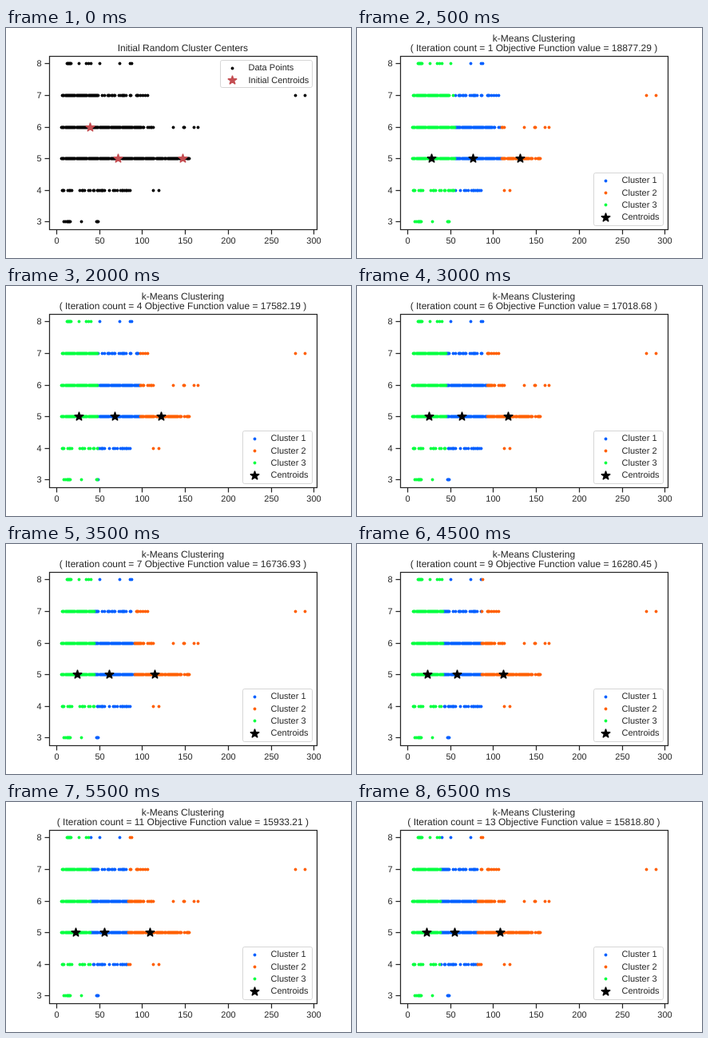
Animation of 432x288 px, one loop 7000 ms. Source, as an HTML page with a canvas:

```html
<!DOCTYPE html>
<html lang="en">
<head>
<meta charset="utf-8">
<title>k-Means Clustering</title>
<style>
  html, body { margin: 0; height: 100%; overflow: hidden; background: #fff; }
  canvas { display: block; }
</style>
</head>
<body>
<canvas id="plot" width="432" height="288"></canvas>
<script>
const ctx = document.getElementById('plot').getContext('2d');
const STEP_MS = 500, LAST = 13;
const INK = '#262626', RED = '#c44e52', BLUE = '#0060ff', ORANGE = '#ff6000', GREEN = '#05ff41';

// Each row is filled up to `solid`, thins out until `last`, and may have a few strays
const rows = [
  { y: 8, first: 12, solid: 17, last: 50, chance: 0.17, strays: [74, 86, 88] },
  { y: 7, first: 7, solid: 49, last: 106, chance: 0.45, strays: [278, 289] },
  { y: 6, first: 6, solid: 99, last: 113, chance: 0.7, strays: [136, 148, 149, 160, 165] },
  { y: 5, first: 6, solid: 112, last: 155, chance: 0.8, strays: [] },
  { y: 4, first: 7, solid: 9, last: 86, chance: 0.42, strays: [113, 119] },
  { y: 3, first: 9, solid: 9, last: 16, chance: 0.7, strays: [29, 47, 48, 49] }
];
const random = (x, y) => {
  const v = Math.sin(x * 12.9898 + y * 78.233) * 43758.5453;
  return v - Math.floor(v);
};
const points = rows.flatMap(({ y, first, solid, last, chance, strays }) => {
  const xs = [...strays];
  for (let x = first; x <= last; x++) {
    if (x <= solid || x === last || random(x, y) < chance) xs.push(x);
  }
  return xs.map(x => ({ x, y }));
});

// Low, middle and high centroid after n iterations
function centroids(n) {
  if (n === 0) return [39.5, 72, 147.5];
  const left = ((LAST - n) / (LAST - 1)) ** 1.75;
  return [Math.max(22.2, 28.6 - 0.57 * n), 55 + 21.5 * left, 108 + 23.5 * left];
}

const objectiveKeys = [
  [2, 18445.59], [4, 17582.19], [7, 16736.93], [9, 16280.45], [11, 15933.21], [13, 15818.80]
];
function objective(n) {
  const i = Math.max(1, objectiveKeys.findIndex(([at]) => at >= n));
  const [[n0, v0], [n1, v1]] = objectiveKeys.slice(i - 1, i + 1);
  return v0 + (v1 - v0) * (n - n0) / (n1 - n0);
}

// Data to pixel centres
const snap = v => Math.round(v) + 0.5;
const px = x => snap(62.77 + x * 1.0755);
const py = y => snap(44.44 + (8 - y) * 39.535);

function text(str, x, y, size = 11, align = 'left') {
  ctx.font = `${size}px "Liberation Sans", Arial, sans-serif`;
  ctx.textRendering = 'geometricPrecision';
  ctx.textAlign = align;
  ctx.fillStyle = INK;
  ctx.fillText(str, x, y);
}

function dot(x, y, color) {
  ctx.fillStyle = color;
  ctx.beginPath();
  ctx.arc(x, y, 1.9, 0, 2 * Math.PI);
  ctx.fill();
}

function star(x, y, color) {
  ctx.beginPath();
  for (let i = 0; i < 10; i++) {
    const r = i % 2 ? 2.25 : 5.9, a = i * Math.PI / 5;
    ctx.lineTo(x + r * Math.sin(a), y - r * Math.cos(a));
  }
  ctx.closePath();
  ctx.fillStyle = ctx.strokeStyle = color;
  ctx.lineWidth = 1.3;
  ctx.lineJoin = 'bevel';
  ctx.fill();
  ctx.stroke();
}

function line(x1, y1, x2, y2) {
  ctx.beginPath();
  ctx.moveTo(x1, y1);
  ctx.lineTo(x2, y2);
  ctx.stroke();
}

function axes() {
  ctx.strokeStyle = INK;
  ctx.lineWidth = 1.25;
  ctx.lineJoin = 'miter';
  ctx.strokeRect(54.5, 35.5, 335, 217);
  for (let x = 0; x <= 300; x += 50) {
    line(px(x), 252.5, px(x), 258.5);
    text(x, px(x), 270, 11, 'center');
  }
  for (let y = 3; y <= 8; y++) {
    line(48.5, py(y), 54.5, py(y));
    text(y, 44.5, py(y) + 3.5, 11, 'right');
  }
}

function legend(x, y, width, height, entries) {
  ctx.beginPath();
  ctx.roundRect(x, y, width, height, 2.2);
  ctx.fillStyle = 'rgba(255,255,255,0.8)';
  ctx.strokeStyle = 'rgba(204,204,204,0.8)';
  ctx.lineWidth = 1;
  ctx.fill();
  ctx.stroke();
  entries.forEach(([label, mark, color], i) => {
    const rowY = y + 9.6 + i * 15.4;
    mark(x + 15, Math.floor(rowY) + 0.5, color);
    text(label, x + 35, Math.round(rowY + 3));
  });
}

function drawStart() {
  text('Initial Random Cluster Centers', 221.4, 29, 12, 'center');
  points.forEach(p => dot(px(p.x), py(p.y), '#000'));
  centroids(0).forEach((x, i) => star(px(x), py(i ? 5 : 6), RED));
  legend(268.5, 40.5, 115, 34, [
    ['Data Points', dot, '#000'], ['Initial Centroids', star, RED]
  ]);
}

function drawIteration(n) {
  text('k-Means Clustering', 221.4, 17, 12, 'center');
  text(`( Iteration count = ${n} Objective Function value = ${objective(n).toFixed(2)} )`,
    221.4, 29, 12, 'center');
  const [low, middle, high] = centroids(n - 1);
  const lowEdge = (low + middle) / 2, highEdge = (middle + high) / 2;
  const colorOf = x => x < lowEdge ? GREEN : x < highEdge ? BLUE : ORANGE;
  for (const color of [BLUE, ORANGE, GREEN]) {
    points.filter(p => colorOf(p.x) === color).forEach(p => dot(px(p.x), py(p.y), color));
  }
  centroids(n).forEach(x => star(px(x), py(5), '#000'));
  legend(296.5, 181.5, 87, 66, [
    ['Cluster 1', dot, BLUE], ['Cluster 2', dot, ORANGE],
    ['Cluster 3', dot, GREEN], ['Centroids', star, '#000']
  ]);
}

function frame() {
  const step = Math.floor(performance.now() / STEP_MS) % (LAST + 1);
  ctx.fillStyle = '#fff';
  ctx.fillRect(0, 0, 432, 288);
  axes();
  if (step) drawIteration(step); else drawStart();
  requestAnimationFrame(frame);
}
frame();
</script>
</body>
</html>
```
